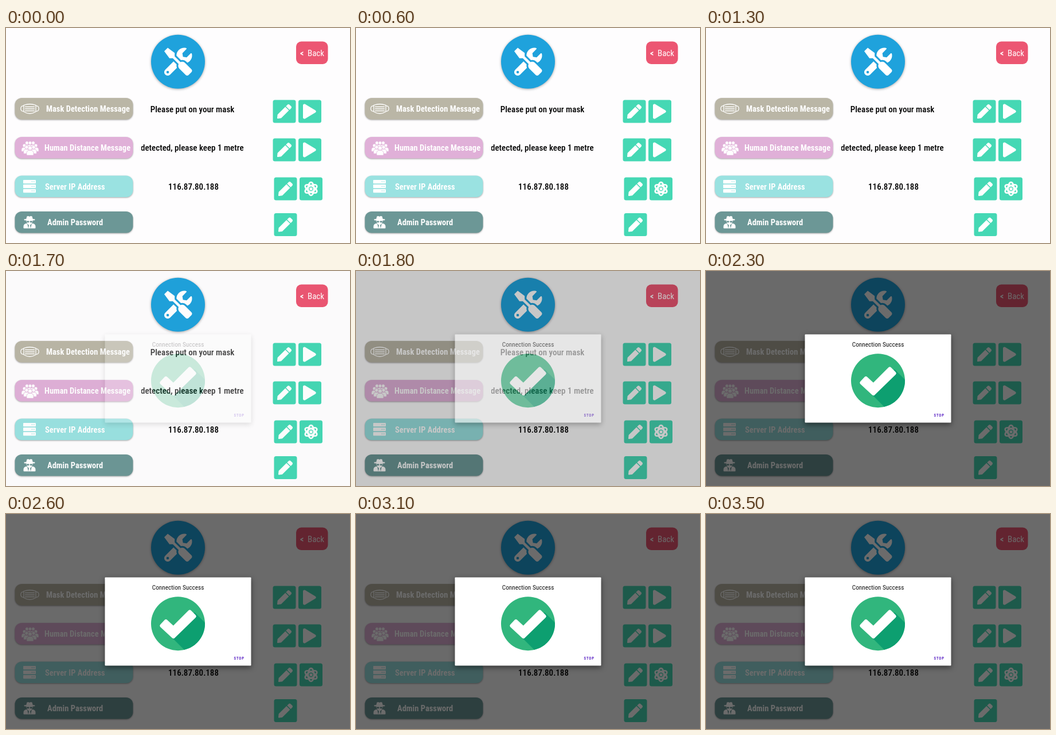
Recreate the animation shown at these times as an HTML page with a canvas. Size 600 by 375 pixels, loop 3.6 s.

```html
<!DOCTYPE html>
<html lang="en">
<head>
<meta charset="utf-8">
<title>Settings</title>
<style>
html, body { margin: 0; width: 100%; height: 100%; overflow: hidden; background: #fff; }
canvas { display: block; width: 600px; height: 375px; }
</style>
</head>
<body>
<canvas id="stage"></canvas>
<script>
const W = 600, H = 375, LOOP = 3600, STEP = 100;
const canvas = document.getElementById('stage');
const ctx = canvas.getContext('2d');
const dpr = window.devicePixelRatio || 1;
canvas.width = W * dpr;
canvas.height = H * dpr;

const FACE = '"Roboto Condensed", Roboto, "Liberation Sans", sans-serif';
const GREEN = '#45d8b4';

// Glyph outlines on a 512 unit grid
const PEN = new Path2D('M291 93L419 221 141 499 27 512C11 514-2 501 0 485L13 371ZM498 74L438 14C419-5 389-5 370 14L313 71 441 199 498 142C517 123 517 93 498 74Z');
const PLAY = new Path2D('M424 215L72 7C44-10 0 6 0 48V464C0 502 41 524 72 505L424 297C456 279 456 233 424 215Z');
const DRIVER = new Path2D('M501 396L384 279C361 256 326 251 299 265L192 158V96L64 0 0 64 96 192H158L265 299C251 326 256 361 279 384L396 501C410 516 434 516 448 501L501 448C516 434 516 410 501 396Z');
const WRENCH = new Path2D('M332 225C360 225 387 236 407 256L426 275C442 269 457 259 470 246C507 209 519 157 508 109C505 100 494 97 487 104L413 178 345 167 334 99 408 24C415 18 412 7 403 4C355-8 303 5 266 42C238 71 224 108 225 146L307 228Z');
const HANDLE = new Path2D('M228 307L171 250 19 403C-6 428-6 468 19 493S84 518 109 493L233 370C225 350 223 328 228 307ZM64 472A24 24 0 1 1 64 424A24 24 0 1 1 64 472Z');

function box(x, y, w, h, r, color) {
  ctx.fillStyle = color;
  ctx.beginPath();
  ctx.roundRect(x, y, w, h, r);
  ctx.fill();
}

function disc(x, y, r, color) {
  ctx.fillStyle = color;
  ctx.beginPath();
  ctx.arc(x, y, r, 0, 2 * Math.PI);
  ctx.fill();
}

function poly(points, color) {
  ctx.fillStyle = color;
  ctx.beginPath();
  points.forEach(([x, y]) => ctx.lineTo(x, y));
  ctx.closePath();
  ctx.fill();
}

function glyph(path, x, y, size) {
  ctx.save();
  ctx.translate(x, y);
  ctx.scale(size / 512, size / 512);
  ctx.fillStyle = '#fff';
  ctx.fill(path, 'evenodd');
  ctx.restore();
}

function text(str, x, y, size, weight, color, align = 'left', gap = 0) {
  ctx.font = `${weight} condensed ${size}px ${FACE}`;
  ctx.letterSpacing = gap + 'px';
  ctx.textAlign = align;
  ctx.fillStyle = color;
  ctx.fillText(str, x, y);
}

function shadowed(blur, dy, alpha, draw) {
  ctx.save();
  ctx.shadowColor = `rgba(0,0,0,${alpha})`;
  ctx.shadowBlur = blur * dpr;
  ctx.shadowOffsetY = dy * dpr;
  draw();
  ctx.restore();
}

function maskIcon() {
  ctx.strokeStyle = '#fff';
  ctx.lineWidth = 1.3;
  ctx.beginPath();
  ctx.moveTo(31, 134.5);
  ctx.quadraticCurveTo(41.5, 131, 52, 134.5);
  ctx.lineTo(52, 146);
  ctx.quadraticCurveTo(41.5, 152.5, 31, 146);
  ctx.closePath();
  for (const y of [137.5, 141, 144.5]) {
    ctx.moveTo(33, y);
    ctx.lineTo(50, y);
  }
  for (const [x, s] of [[31, -1], [52, 1]]) {
    ctx.moveTo(x, 136);
    ctx.bezierCurveTo(x + s * 7, 134, x + s * 7, 147, x, 145);
  }
  ctx.stroke();
}

function person(x, y, r, edge) {
  ctx.strokeStyle = edge;
  ctx.lineWidth = 0.8;
  box(x - r * 1.7, y + r, r * 3.4, r * 2.5, [r * 1.4, r * 1.4, 1, 1], '#fff');
  ctx.stroke();
  disc(x, y, r, '#fff');
  ctx.stroke();
}

function crowdIcon() {
  const edge = '#e0b0d8';
  for (const x of [36.5, 42, 47.5]) person(x, 200.5, 2.9, edge);
  for (const x of [32, 52]) person(x, 205, 3, edge);
  for (const x of [36, 48]) person(x, 208, 3.2, edge);
  person(42, 209.5, 3.6, edge);
}

function serverIcon() {
  for (const y of [265, 273, 281]) {
    box(30, y, 22, 6.3, 1, '#fff');
    disc(45.5, y + 3.1, 0.9, '#9ae2e1');
    disc(48.8, y + 3.1, 0.9, '#9ae2e1');
  }
}

function spyIcon() {
  const bg = '#6c9796';
  poly([[35, 334], [36.5, 328.5], [39, 328], [41, 329], [43, 328], [45.5, 328.5], [47, 334]], '#fff');
  box(31.5, 333.2, 19, 2.2, 1.1, '#fff');
  box(35.5, 335, 11, 7, [0, 0, 5, 5], '#fff');
  box(36, 336.6, 4.4, 2.6, 1.2, bg);
  box(41.6, 336.6, 4.4, 2.6, 1.2, bg);
  box(30.5, 341, 21, 8.5, [5, 5, 1, 1], '#fff');
  poly([[37, 341], [40, 344], [39, 349.5]], bg);
  poly([[45, 341], [42, 344], [43, 349.5]], bg);
}

function atomIcon(x, y) {
  ctx.strokeStyle = '#fff';
  ctx.lineWidth = 2.7;
  for (const turn of [1, 3, 5]) {
    ctx.beginPath();
    ctx.ellipse(x, y, 11.4, 5.2, turn * Math.PI / 6, 0, 2 * Math.PI);
    ctx.stroke();
  }
  disc(x, y, 2.6, '#fff');
}

function button(x, y, icon) {
  box(x, y, 40, 40, 3.5, GREEN);
  if (icon === 'pen') glyph(PEN, x + 7.5, y + 7.5, 25);
  if (icon === 'play') glyph(PLAY, x + 8, y + 7, 26);
  if (icon === 'atom') atomIcon(x + 20, y + 20);
}

function pill(y, color, label, x, icon) {
  shadowed(2.5, 1, 0.35, () => box(15.5, y, 206, 37.5, 12, color));
  icon();
  text(label, x, y + 24, 14.5, 700, '#fff');
}

function page() {
  ctx.fillStyle = '#fefdfe';
  ctx.fillRect(0, 0, W, H);

  shadowed(4, 1, 0.35, () => disc(300, 58.8, 47, '#1fa2dc'));
  for (const part of [DRIVER, WRENCH, HANDLE]) glyph(part, 276, 34.5, 48.5);

  box(506, 23.5, 55.5, 39.5, 9, '#ec5672');
  text('<', 513, 49, 14, 700, '#fff');
  text('Back', 526, 49, 15, 400, '#fff');

  pill(122, '#bab6a6', 'Mask Detection Message', 70, maskIcon);
  pill(190, '#e0b0d8', 'Human Distance Message', 67, crowdIcon);
  pill(257.5, '#9ae2e1', 'Server IP Address', 68, serverIcon);
  pill(320, '#6c9796', 'Admin Password', 72, spyIcon);

  text('Please put on your mask', 325, 147, 15, 500, '#000', 'center');
  ctx.save();
  ctx.beginPath();
  ctx.rect(236, 195, 178.5, 30);
  ctx.clip();
  text('detected, please keep 1 metre away', 235, 214, 15, 500, '#000');
  ctx.restore();
  text('116.87.80.188', 327, 282, 15, 500, '#000', 'center');

  button(465.5, 125.5, 'pen');
  button(510, 125.5, 'play');
  button(465.5, 192.5, 'pen');
  button(510, 192.5, 'play');
  button(467.5, 260.5, 'pen');
  button(512, 260.5, 'atom');
  button(467.5, 323, 'pen');
}

function dialog() {
  shadowed(10, 3, 0.5, () => box(172.5, 110.5, 255, 154, 1, '#fff'));
  text('Connection Success', 300, 132, 11.3, 400, '#111', 'center');

  ctx.save();
  disc(300, 191.2, 47, '#31b67d');
  ctx.clip();
  poly([[329, 171.5], [391, 233.5], [350, 276], [288, 214]], '#0d9f70');
  ctx.restore();

  const tick = [[272, 195], [279, 187.5], [292, 199.5], [320.5, 171], [328, 178.5], [292, 213.5]];
  poly(tick, '#fff');
  ctx.strokeStyle = '#fff';
  ctx.lineWidth = 7;
  ctx.lineJoin = 'round';
  ctx.stroke();

  text('STOP', 397.5, 254, 6.6, 700, '#5a22c4', 'left', 0.9);
}

// The dialog is composed apart so that it can fade as one layer
const layer = document.createElement('canvas');
layer.width = canvas.width;
layer.height = canvas.height;

function bake(draw) {
  ctx.setTransform(dpr, 0, 0, dpr, 0, 0);
  ctx.clearRect(0, 0, W, H);
  draw();
  const sheet = document.createElement('canvas');
  sheet.width = canvas.width;
  sheet.height = canvas.height;
  sheet.getContext('2d').drawImage(canvas, 0, 0);
  return sheet;
}

const back = bake(page);
const front = bake(dialog);

function opacity(t) {
  const p = Math.min(1, Math.max(0, (t - 1600) / 300));
  return 0.6 * p + 0.4 * p * p;
}

function render(t) {
  const a = opacity(t);
  ctx.drawImage(back, 0, 0, W, H);
  if (!a) return;
  const dim = t < 1800 ? 0.01 : t < 1900 ? 0.22 : 0.58;
  ctx.fillStyle = `rgba(0,0,0,${dim})`;
  ctx.fillRect(0, 0, W, H);
  ctx.globalAlpha = a;
  ctx.drawImage(front, 0, 0, W, H);
  ctx.globalAlpha = 1;
}

const start = performance.now();
function tick() {
  const t = (performance.now() - start) % LOOP;
  render(Math.floor(t / STEP) * STEP);
  requestAnimationFrame(tick);
}
tick();
</script>
</body>
</html>
```
